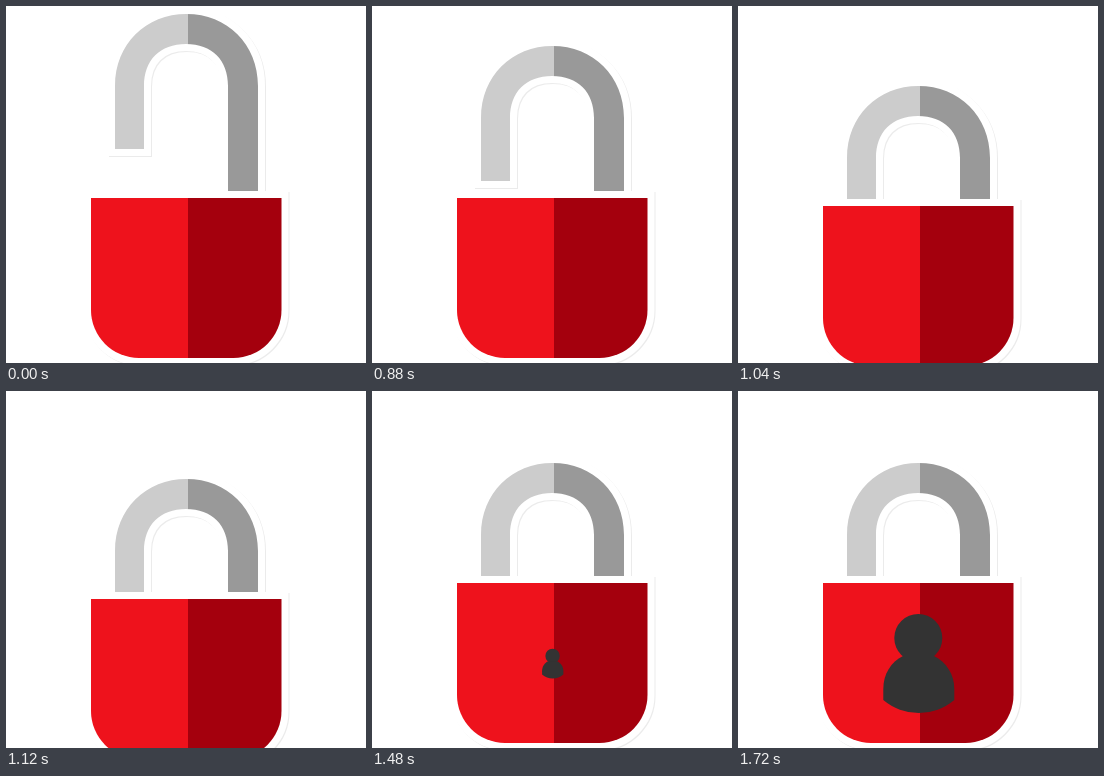
An HTML page that plays this animation: 360 by 357 pixels, repeating every 5 s.

```html
<!DOCTYPE html>
<html lang="en">
<head>
<meta charset="utf-8">
<title>Padlock</title>
<style>
  html, body { margin: 0; width: 100%; height: 100%; overflow: hidden; background: #fff; }
  svg { display: block; width: 100vw; height: 100vh; }
  .sticker { filter: drop-shadow(1px 1px .6px rgba(0, 0, 0, .08)); }
  .edge { fill: #fff; stroke: #fff; stroke-width: 14; }
</style>
</head>
<body>
<svg viewBox="0 0 360 357">
  <defs>
    <path id="bow" d="M109 143V80C109 38 140 8 180.5 8S252 38 252 80V215H222V80C222 54 206 38 180 38S138 54 138 80V143Z"/>
    <path id="case" d="M85 192H275.5V304A48 48 0 0 1 227.5 352H133A48 48 0 0 1 85 304Z"/>
    <clipPath id="bowClip"><use href="#bow"/></clipPath>
    <clipPath id="caseClip"><use href="#case"/></clipPath>
  </defs>
  <g id="lock">
    <g id="shackle">
      <use href="#bow" class="edge sticker"/>
      <g clip-path="url(#bowClip)">
        <rect x="100" width="82" height="230" fill="#ccc"/>
        <rect x="182" width="80" height="230" fill="#999"/>
      </g>
    </g>
    <use href="#case" class="edge sticker"/>
    <g clip-path="url(#caseClip)">
      <rect x="80" y="190" width="102" height="170" fill="#ee121c"/>
      <rect x="182" y="190" width="100" height="170" fill="#a4000d"/>
    </g>
  </g>
  <g id="person" fill="#333">
    <circle cx="180.3" cy="247" r="24"/>
    <path d="M145.3 309V298C145.3 283 153 271 165 265H196C208 271 216.3 283 216.3 298V309A55 55 0 0 1 145.3 309Z"/>
  </g>
</svg>
<script>
  const LOOP = 5000, STEP = 40;
  const part = id => document.getElementById(id);
  const lock = part('lock'), shackle = part('shackle'), person = part('person');

  // [time, value] keys, joined by straight lines
  const slide = [[800, 0], [960, 64]];
  const bounce = [[960, 0], [1120, 16], [1240, 0]];
  const pop = [[1440, 0], [1600, 1.2], [1720, 1]];

  function at(keys, t) {
    if (t <= keys[0][0]) return keys[0][1];
    for (let i = 1; i < keys.length; i++) {
      const [t0, a] = keys[i - 1], [t1, b] = keys[i];
      if (t < t1) return a + (b - a) * (t - t0) / (t1 - t0);
    }
    return keys[keys.length - 1][1];
  }

  function draw(now) {
    const t = Math.floor((now % LOOP) / STEP) * STEP;
    const size = at(pop, t);
    shackle.setAttribute('transform', `translate(0 ${at(slide, t)})`);
    lock.setAttribute('transform', `translate(0 ${at(bounce, t)})`);
    person.setAttribute('transform', `translate(180.7 272.6) scale(${size}) translate(-180.7 -272.6)`);
    person.style.display = size ? '' : 'none';
  }

  const start = performance.now();
  function tick() {
    draw(performance.now() - start);
    requestAnimationFrame(tick);
  }
  tick();
</script>
</body>
</html>
```
